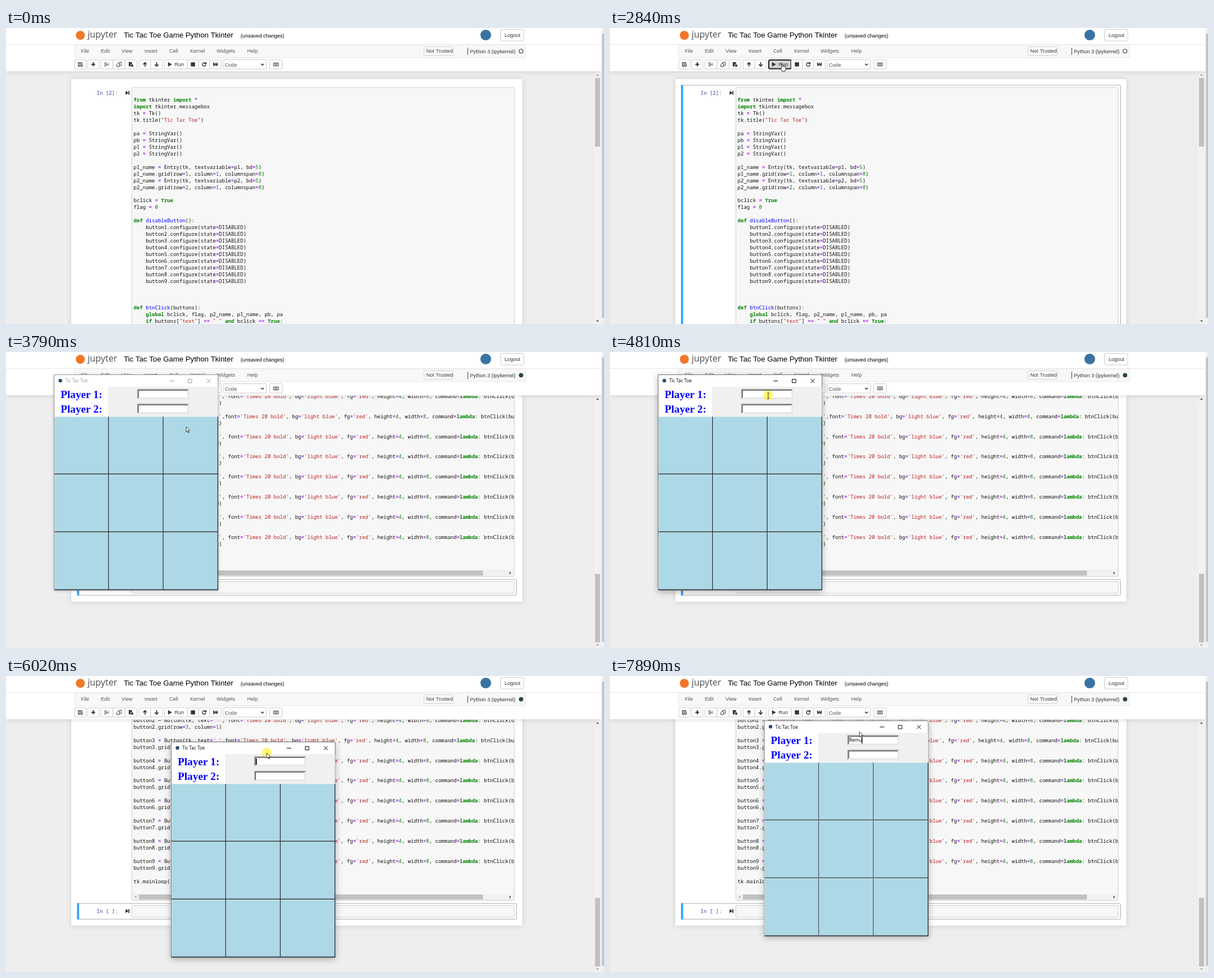
An HTML page with a canvas that plays this animation: 1062x527 px, repeating every 8 s.

```html
<!DOCTYPE html>
<html lang="en">
<head>
<meta charset="utf-8">
<title>Notebook demo</title>
<style>
html, body { margin: 0; width: 100%; height: 100%; overflow: hidden; background: #eee; }
canvas { display: block; }
</style>
</head>
<body>
<canvas id="stage" width="1062" height="527"></canvas>
<script>
const ctx = document.getElementById('stage').getContext('2d');
const LOOP = 8000, SELECT = 1690, PRESS = 2560, SCROLL = 2900, OPEN = 3100, FOCUS = 4610;
const SANS = '"Liberation Sans", Arial, sans-serif';
const UI = '"Open Sans", sans-serif';
const MONO = '"Noto Sans Mono", monospace';
const CHAR = 5.411, LINE = 11.94;

// Motion keys: time, x, y
const pointerKeys = [
  [270, 983, 510], [480, 839, 387], [670, 839, 387], [810, 496, 201], [1070, 496, 201],
  [1280, 323, 92], [1550, 323, 92], [1690, 325, 110], [1830, 325, 110], [2040, 322, 37],
  [2290, 306, 62], [2360, 305, 64], [2900, 305, 64], [3320, 333, 136], [3390, 333, 136],
  [3530, 333, 157], [3720, 333, 157], [3790, 320, 133], [3860, 320, 133], [4540, 281, 78],
  [5280, 281, 78], [5700, 255, 59], [5760, 255, 59], [5810, 275, 63], [5870, 275, 63],
  [6020, 463, 137], [6080, 463, 137], [6280, 442, 97], [6400, 436, 91], [6760, 443, 99]
];
const windowKeys = [
  [0, 85, 40], [5870, 85, 40], [6020, 293, 117], [6080, 293, 117],
  [6280, 272, 77], [6400, 266, 71], [6760, 273.6, 79.3]
];
const clicks = [[1690, 1830], [4610, 4880], [5700, 6760]];
const typed = 'Remu', typeTimes = [7090, 7380, 7690, 7890];

const topCode = `from tkinter import *
import tkinter.messagebox
tk = Tk()
tk.title("Tic Tac Toe")

pa = StringVar()
pb = StringVar()
p1 = StringVar()
p2 = StringVar()

p1_name = Entry(tk, textvariable=p1, bd=5)
p1_name.grid(row=1, column=1, columnspan=8)
p2_name = Entry(tk, textvariable=p2, bd=5)
p2_name.grid(row=2, column=1, columnspan=8)

bclick = True
flag = 0

def disableButton():
${Array.from({ length: 9 }, (_, i) => `    button${i + 1}.configure(state=DISABLED)`).join('\n')}



def btnClick(buttons):
    global bclick, flag, p2_name, p1_name, pb, pa
    if buttons["text"] == " " and bclick == True:`.split('\n');

const endCode = [];
for (let n = 2; n < 10; n++) endCode.push(
  `button${n} = Button(tk, text=' ',${n === 3 ? '' : ' '}font='Times 20 bold', bg='light blue', fg='red', height=4, width=8, command=lambda: btnClick(button${n}))`,
  `button${n}.grid(row=${3 + Math.floor((n - 1) / 3)}, column=${(n - 1) % 3})`, '');
endCode.push('tk.mainloop()');

const keywords = new Set('from import def global if and lambda True'.split(' '));

function sample(keys, t) {
  const i = keys.findIndex(k => k[0] > t);
  if (i < 0) return keys[keys.length - 1].slice(1);
  if (!i) return keys[0].slice(1);
  const a = keys[i - 1], b = keys[i], p = (t - a[0]) / (b[0] - a[0]);
  return [a[1] + (b[1] - a[1]) * p, a[2] + (b[2] - a[2]) * p];
}

function box(x, y, w, h, fill, stroke, r = 0, lw = 1) {
  ctx.beginPath();
  ctx.roundRect(x, y, w, h, r);
  if (fill) { ctx.fillStyle = fill; ctx.fill(); }
  if (stroke) { ctx.strokeStyle = stroke; ctx.lineWidth = lw; ctx.stroke(); }
}

function text(str, x, y, font, color) {
  ctx.font = font;
  ctx.fillStyle = color;
  ctx.fillText(str, x, y);
}

function shape(d, x, y, fill, stroke, lw = 1) {
  const path = new Path2D(d);
  ctx.save();
  ctx.translate(x, y);
  if (fill) { ctx.fillStyle = fill; ctx.fill(path); }
  if (stroke) { ctx.strokeStyle = stroke; ctx.lineWidth = lw; ctx.stroke(path); }
  ctx.restore();
}

function dot(x, y, r, fill, stroke) {
  ctx.beginPath();
  ctx.arc(x, y, r, 0, 7);
  if (fill) { ctx.fillStyle = fill; ctx.fill(); }
  if (stroke) { ctx.strokeStyle = stroke; ctx.lineWidth = 1.1; ctx.stroke(); }
}

function shadowed(color, blur, dy, draw) {
  ctx.save();
  ctx.shadowColor = color;
  ctx.shadowBlur = blur;
  ctx.shadowOffsetY = dy;
  draw();
  ctx.restore();
}

function codeLine(line, x, y) {
  let afterDef = false;
  for (const m of line.matchAll(/("[^"]*"|'[^']*')|([A-Za-z_]\w*)|(\d+)|([=*]+)|[^\s]/g)) {
    const [tok, str, word, num, op] = m;
    const key = keywords.has(word);
    const color = str ? '#ba2121' : key ? '#008000' : num ? '#008800' : op ? '#aa22ff' : word && afterDef ? '#0000ff' : '#111';
    text(tok, x + m.index * CHAR, y, `${key || op ? 'bold ' : ''}9.02px ${MONO}`, color);
    if (word) afterDef = word === 'def';
  }
}

function codeBlock(lines, y, bottom) {
  ctx.save();
  ctx.beginPath();
  ctx.rect(224, 78, 678, bottom - 78);
  ctx.clip();
  lines.forEach((line, i) => codeLine(line, 226.6, y + i * LINE));
  ctx.restore();
}

function prompt(label, y) {
  text(label, 161, y, `9px ${MONO}`, '#303f9f');
  shape('M0-7L5-3.5L0 0ZM5-7H6.6V0H5Z', 212.5, y, '#222');
}

function cellFrame(y, h, color) {
  box(126.5, y, 780, h, null, '#ababab', 1);
  box(126, y - .5, 4, h + 1, color);
}

function notebook(t) {
  const end = t >= SCROLL;
  box(0, 0, 1062, 527, '#eee');
  shadowed('rgba(87,87,87,.2)', 9, 0, () =>
    end ? box(116, 60, 801, 384.5, '#fff') : box(116, 91, 801, 460, '#fff'));
  if (end) {
    box(223.5, 60, 679, 339.5, '#f7f7f7', '#cfcfcf', 1.5);
    codeBlock(endCode, 82, 388);
    box(224, 388, 678, 11, '#f1f1f1');
    box(236, 389, 611, 9, '#c1c1c1');
    shape('M2-2.5V2.5L-1 0Z', 229.5, 393.5, '#a3a3a3');
    shape('M-1-2.5V2.5L2 0Z', 895, 393.5, '#505050');
    cellFrame(405, 28, '#42a5f5');
    box(223.5, 408.5, 679, 21, '#f7f7f7', '#cfcfcf', 1.5);
    prompt('In [ ]:', 422);
  } else {
    if (t >= SELECT) cellFrame(102, 440, t < PRESS ? '#66bb6a' : '#42a5f5');
    box(223.5, 106, 679, 440, '#f7f7f7', '#cfcfcf', 1.5);
    prompt('In [2]:', 119);
    codeBlock(topCode, 131.3, 527);
  }
  box(1045, 78, 11, 449, '#f1f1f1');
  box(1046, end ? 395 : 89, 9, 122, '#c1c1c1');
  shape('M-2.5 1.5L0-1.5L2.5 1.5Z', 1050.5, 83.5, end ? '#505050' : '#a3a3a3');
  shape('M-2.5-1.5L0 1.5L2.5-1.5Z', 1050.5, 522, end ? '#a3a3a3' : '#505050');
}

// Toolbar buttons: left, width, icon, line width (0 fills)
const tools = [
  [122, 20, 'M-3.5-3.5H2.3L3.5-2.3V3.5H-3.5ZM-2-3.5V-1H1.5V-3.5M-2 3.5V1H2V3.5', 1],
  [145, 20, 'M-3.5 0H3.5M0-3.5V3.5', 2],
  [168.5, 21.5, 'M-1.5-2L4 2M-1.5 2L4-2M-1.5-2A1.3 1.2 0 1 1-4-2A1.3 1.2 0 1 1-1.5-2M-1.5 2A1.3 1.2 0 1 1-4 2A1.3 1.2 0 1 1-1.5 2', .8],
  [190, 21.5, 'M-4 0L-2-2H.5V4H-4ZM-1-2V-2.3L.7-4H4V2H.5', 1],
  [211.5, 21, 'M-4-4H2V-1H-.5V3.5H-4ZM.3-.2H2.5L4 1.3V4H.3Z', 0],
  [236.5, 20.5, 'M0 4V-3M-3.2 0L0-3.2L3.2 0', 1.7],
  [257, 21, 'M0-4V3M-3.2 0L0 3.2L3.2 0', 1.7],
  [281.5, 40.5, 'M-14-4L-7 0L-14 4Z', 0],
  [322, 20, 'M-3.7-3.7H3.7V3.7H-3.7Z', 0],
  [342, 20, 'M2.3-2A3.1 3.1 0 1 0 3 1M3.4-4V-1H.4', 1.5],
  [362, 20, 'M-4-3.7L0-.3V-3.7L3-.6V-3.5H4V3.5H3V.6L0 3.7V.3L-4 3.7Z', 0],
  [468.5, 22, 'M-4.5-2.7H4.5V2.7H-4.5ZM-3-1H3M-3 1H3', .9]
];
const menus = { File: 133, Edit: 168.5, View: 205, Insert: 246, Cell: 290, Kernel: 327, Widgets: 374, Help: 428.5 };

function header(t) {
  const small = `9.1px ${SANS}`;
  shadowed('rgba(87,87,87,.25)', 9, 0, () => box(0, -20, 1057, 97, '#fff'));
  box(0, 29, 1057, 1, '#e7e7e7');
  dot(132, 13, 8, '#f37726');
  text('jupyter', 145, 16.8, `16px ${UI}`, '#4e4e4e');
  text('Tic Tac Toe Game Python Tkinter', 209.3, 16.5, `13.2px ${SANS}`, '#000');
  text('(unsaved changes)', 416.8, 16.5, small, '#000');
  dot(852, 12.5, 9.5, '#3873a3');
  box(878.5, 2.5, 41, 20.5, '#fff', '#ccc', 1.5);
  text('Logout', 885.5, 16, small, '#333');

  box(121.5, 30, 801, 22.5, '#f8f8f8', '#e7e7e7', 1);
  for (const name in menus) text(name, menus[name], 44.3, small, '#555');
  box(742.5, 33.5, 52, 15, '#fff', '#ccc', 1);
  text('Not Trusted', 746.5, 44.3, small, '#333');
  box(819.5, 35, 1, 13, '#333');
  text('Python 3 (ipykernel)', 823.8, 44.5, small, '#333');
  if (t >= SCROLL) dot(914.7, 41.3, 3.9, '#2b4440');
  else dot(914.7, 41.3, 3.5, null, '#333');

  for (const [x, w, icon, lw] of tools) {
    box(x, 56.5, w, 16.5, '#fff', '#ccc', 1);
    if (x === 281.5 && t >= 2200 && t < SCROLL) {
      const down = t >= PRESS;
      box(x + .5, 57, w - 1, 15.5, down ? '#d4d4d4' : '#e6e6e6', down ? '#222' : '#adadad', 2, down ? 2 : 1);
    }
    shape(icon, x + w / 2, 64.8, lw ? null : '#333', lw ? '#333' : null, lw);
  }
  text('Run', 299.5, 68, small, '#333');
  box(385.5, 56.5, 77, 16.5, '#fff', '#ccc', 1);
  text('Code', 388.5, 69, small, '#555');
  shape('M-2.5-1.3L0 1.3L2.5-1.3', 455.5, 65, null, '#333', 1.4);

  box(1057, 0, 5, 527, '#f1f1f1');
  box(1058.5, 10, 3.5, 506, '#c1c1c1');
}

function entry(x, y) {
  box(x, y, 92, 18, '#fff');
  shape('M0 18V0H92L89 3H3V15Z', x, y, '#9a9a9a');
  shape('M1.7 16V1.7H90L89 3H3V15Z', x, y, '#6c6c6c');
  shape('M92 0V18H0L3 15H89V3Z', x, y, '#e6e6e6');
}

function gameWindow(t) {
  const [x, y] = sample(windowKeys, t), active = t >= FOCUS;
  const ink = active ? '#000' : '#999';
  ctx.save();
  shadowed(active ? 'rgba(0,0,0,.3)' : 'rgba(0,0,0,.25)', active ? 11 : 5, active ? 3 : 1,
    () => box(x, y, 292, 384, '#fff'));
  box(x + .5, y + .5, 291, 383.5, '#fff', active ? '#777' : '#999');
  ctx.translate(x, y);
  dot(11.5, 11, 3.2, '#2f4a63');
  text('Tic Tac Toe', 20, 14.2, `8.1px ${UI}`, ink);
  shape('M205.5 11.5H213.5M238.5 8.5H245V14.7H238.5ZM271.5 8L278.5 15M278.5 8L271.5 15', 0, 0, null, ink);
  box(96, 22, 195.5, 53, '#f0f0f0');
  [1, 2].forEach(n => {
    text(`Player ${n}:`, 12, 16 + 26 * n, 'bold 19.2px "Liberation Serif", Times, serif', '#0000ff');
    entry(148, 26 * n);
  });
  for (let i = 0; i < 9; i++) {
    const cx = 1 + i % 3 * 97, cy = 75 + Math.floor(i / 3) * 103;
    box(cx, cy, 97, 103, '#add8e6');
    box(cx, cy, 97, .7, '#d5ebf2');
    box(cx, cy, .7, 103, '#d5ebf2');
    box(cx + 95.5, cy, 1.4, 103, '#32383b');
    box(cx, cy + 101.5, 97, 1.4, '#32383b');
  }
  const count = typeTimes.filter(k => t >= k).length;
  const shown = typed.slice(0, count);
  text(shown, 151.3, 38, `8.2px ${UI}`, '#000');
  if (t >= 5880) box(151 + ctx.measureText(shown).width, 30, 1.4, 11, '#000');
  ctx.restore();
}

function pointer(t) {
  if (t < 270) return;
  const [x, y] = sample(pointerKeys, t);
  if (clicks.some(([a, b]) => t >= a && t < b)) dot(x, y - .8, 8.5, 'rgba(255,245,50,.7)');
  const overCode = t < SCROLL && x > 224 && x < 902 && y > 106;
  const overEntry = t > OPEN && t < 5700 && x > 233 && x < 325 && y > 68 && y < 84;
  if (overCode || overEntry) {
    shape('M-2-5H2M0-5V5M-2 5H2', x, y, null, '#222', .9);
  } else if (t < 3000 && x > 281 && x < 322 && y > 56 && y < 74) {
    shape('M0 0Q1.5-1 2 .5V4L6 5Q7 5.3 7 6.5V9L5.8 13H.5L-2 8.5Q-2.5 6.7-1 7L0 8Z', x, y, '#fff', '#111', .9);
  } else {
    shape('M0 0V9.3L2.1 7.4L3.6 10.8L5 10.2L3.6 6.8H6.4Z', x, y, '#fff', '#111', .8);
  }
}

function frame() {
  const t = performance.now() % LOOP;
  notebook(t);
  header(t);
  if (t >= OPEN) gameWindow(t);
  pointer(t);
  requestAnimationFrame(frame);
}
frame();
</script>
</body>
</html>
```
